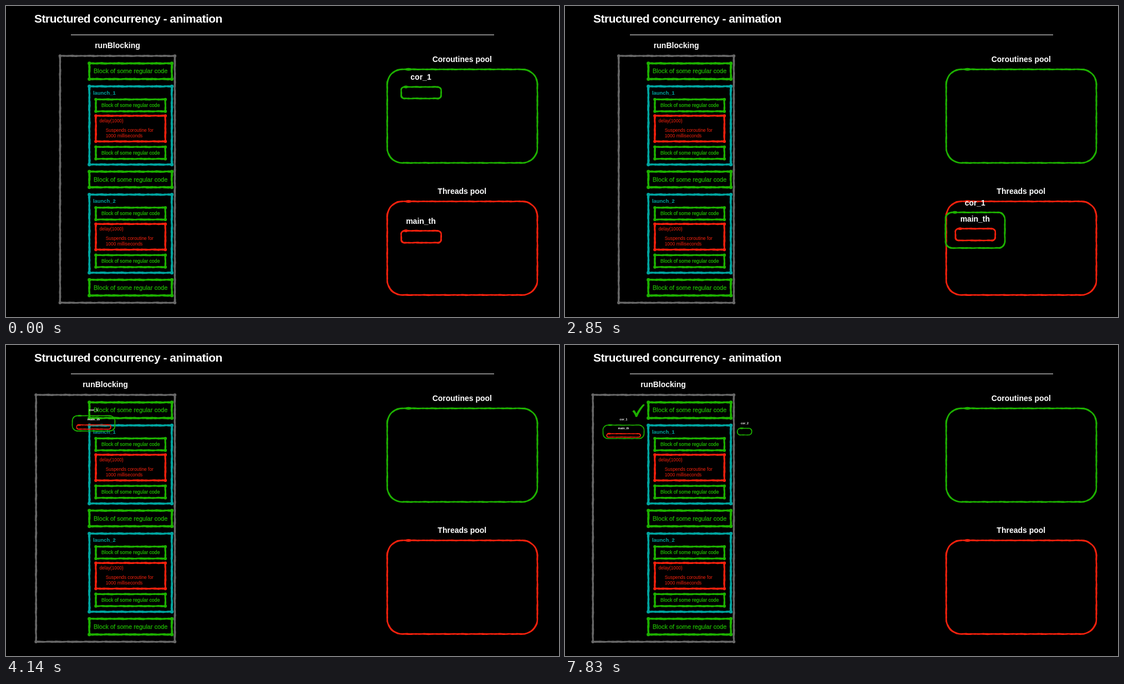
An HTML page with a canvas that plays this animation: 997x561 px, repeating every 8 s.

```html
<!DOCTYPE html>
<html lang="en">
<head>
<meta charset="utf-8">
<title>Structured concurrency</title>
<style>
  html, body { margin: 0; width: 100%; height: 100%; overflow: hidden; background: #000; }
  canvas { display: block; }
</style>
</head>
<body>
<canvas id="stage" width="997" height="561"></canvas>
<script>
const ctx = document.getElementById('stage').getContext('2d');
const GREEN = '#1db100', RED = '#f6210d', TEAL = '#00a5a0', GRAY = '#686868', WHITE = '#fff';
const LOOP = 8000, MOVE = 1800;

// Poses of the coroutine and its thread: [x0, y0, x1, y1, radius, line width]
const CORS = [
  [712.5, 146, 784.5, 166.8, 6, 2.9],
  [694.5, 376, 802, 440.8, 12, 2.9],
  [68.5, 105.5, 142.5, 129.7, 9, 1.7],
  [68.5, 144.5, 142.5, 168.7, 9, 1.7]
];
const THREADS = [
  [712.5, 405.5, 784.5, 427, 6, 2.9],
  [712.5, 405.5, 784.5, 427, 6, 2.9],
  [75.3, 121, 136, 127.3, 3, 1.7],
  [75.3, 160, 136, 166.3, 3, 1.7]
];
// Their labels: [centre x, baseline, font size]
const COR_LABELS = [[748, 133, 14], [748, 364, 14], [105.5, 97.3, 5.2], [105.5, 136.3, 5.2]];
const THREAD_LABELS = [[748, 393, 14], [748, 393, 14], [105.5, 113.4, 5.2], [105.5, 152.4, 5.2]];

const lerp = (a, b, p) => a + (b - a) * p;

// cubic-bezier(.42, 0, .58, 1)
function ease(p) {
  if (p <= 0 || p >= 1) return p <= 0 ? 0 : 1;
  let lo = 0, hi = 1, s;
  for (let i = 0; i < 20; i++) {
    s = (lo + hi) / 2;
    const x = 1.26 * s * (1 - s) ** 2 + 1.74 * s * s * (1 - s) + s ** 3;
    if (x < p) lo = s; else hi = s;
  }
  return s * s * (3 - 2 * s);
}

function text(str, x, y, size, color, weight = 'bold', align = 'left', spacing = 0) {
  ctx.font = `${weight} ${size}px "Liberation Sans", Arial, sans-serif`;
  ctx.textAlign = align;
  ctx.letterSpacing = spacing + 'px';
  ctx.fillStyle = color;
  ctx.fillText(str, x, y);
}

const label = (str, x, y, size = 14) => text(str, x, y, size, WHITE, 'bold', 'center');

const wobble = s => (Math.sin(s * .37) + Math.sin(s * .83 + 2) + Math.sin(s * .19 + 4)) * .1;

// Hand-drawn frame: a closed band of uneven width with blobs where the pen rests
function outline(x0, y0, x1, y1, r, lw, color) {
  const corners = [[x0, y0], [x1, y0], [x1, y1], [x0, y1]];
  const outer = [], inner = [];
  let s = 0;
  const add = (x, y, nx, ny) => {
    const o = lw / 2 * (1 + wobble(s)), i = lw / 2 * (1 + wobble(s + 61));
    outer.push([x + nx * o, y + ny * o]);
    inner.push([x - nx * i, y - ny * i]);
  };
  corners.forEach(([cx, cy], i) => {
    const a = i * Math.PI / 2, dx = Math.cos(a), dy = Math.sin(a);
    const len = (i % 2 ? y1 - y0 : x1 - x0) - 2 * r;
    const n = Math.max(1, Math.round(len / 2.5));
    for (let k = 0; k <= n; k++) {
      const d = r + len * k / n;
      add(cx + dx * d, cy + dy * d, dy, -dx);
      s += len / n;
    }
    if (!r) return;
    const mx = cx + dx * (r + len) - dy * r, my = cy + dy * (r + len) + dx * r;
    for (let k = 1; k < 10; k++) {
      const b = a + (k / 10 - 1) * Math.PI / 2;
      add(mx + Math.cos(b) * r, my + Math.sin(b) * r, Math.cos(b), Math.sin(b));
      s += r * .157;
    }
  });
  ctx.fillStyle = color;
  ctx.beginPath();
  for (const ring of [outer, inner]) {
    ring.forEach(([x, y], i) => i ? ctx.lineTo(x, y) : ctx.moveTo(x, y));
    ctx.closePath();
  }
  ctx.fill('evenodd');
  ctx.beginPath();
  if (r) ctx.ellipse(x0 + r * 1.42, y0, 3 + r * .12, lw * .85, 0, 0, 7);
  else for (const [x, y] of corners) {
    ctx.moveTo(x, y);
    ctx.arc(x, y, lw * .83, 0, 7);
  }
  ctx.fill();
}

function codeBlock(x0, y0, x1, y1, size, lw) {
  outline(x0, y0, x1, y1, 0, lw, GREEN);
  const mid = (x0 + x1) / 2, base = (y0 + y1) / 2 + size * .34;
  const str = 'Block of some regular code';
  text(str, mid, base, size, GREEN, 'normal', 'center');
  ctx.strokeStyle = GREEN;
  ctx.lineWidth = .3;
  ctx.strokeText(str, mid, base);
}

function launch(name, y) {
  outline(150.3, y, 299, y + 141, 0, 3.8, TEAL);
  text(name, 157, y + 15, 9.4, TEAL);
  codeBlock(162, y + 23.5, 287.3, y + 45, 8.7, 3.4);
  outline(162, y + 53, 287.3, y + 99.3, 0, 3.4, RED);
  text('delay(1000)', 168.5, y + 64.7, 8.2, RED, 'normal');
  text('Suspends coroutine for', 179.7, y + 82, 8.4, RED, 'normal');
  text('1000 milliseconds', 179.7, y + 92, 8.4, RED, 'normal');
  codeBlock(162, y + 109.2, 287.3, y + 130.8, 8.7, 3.4);
}

function check(alpha) {
  ctx.globalAlpha = alpha;
  ctx.fillStyle = GREEN;
  ctx.beginPath();
  ctx.moveTo(121.3, 119.5);
  ctx.lineTo(124.5, 117.3);
  ctx.quadraticCurveTo(127, 119.5, 128.8, 123.5);
  ctx.quadraticCurveTo(134, 113.5, 141, 106.8);
  ctx.lineTo(144, 107.8);
  ctx.quadraticCurveTo(135, 118, 130.3, 129.6);
  ctx.lineTo(127.4, 130);
  ctx.quadraticCurveTo(125, 123, 121.3, 119.5);
  ctx.fill();
  ctx.globalAlpha = 1;
}

function draw(t) {
  const steps = [450, 2700, 4950].map(start => ease((t - start) / MOVE));
  const pose = keys => keys[0].map((v, i) =>
    steps.reduce((sum, p, k) => sum + (keys[k + 1][i] - keys[k][i]) * p, v));

  ctx.fillStyle = '#000';
  ctx.fillRect(0, 0, 997, 561);
  text('Structured concurrency - animation', 51, 30.3, 21, WHITE, 'bold', 'left', -.5);
  ctx.fillStyle = '#c4c4c4';
  ctx.fillRect(117, 51.4, 763, 1.3);

  label('runBlocking', lerp(201, 177, steps[1]), 76);
  outline(lerp(97.5, 50.3, steps[1]), 90, 304.4, 535.3, 0, 3.4, GRAY);
  for (const y of [103.5, 298.7, 493.9]) codeBlock(150.3, y, 299, y + 28.3, 11, 3.8);
  launch('launch_1', 145);
  launch('launch_2', 340.2);

  label('Coroutines pool', 822.3, 100.6);
  outline(687.3, 114.3, 958, 283, 27, 2.9, GREEN);
  label('Threads pool', 822.3, 339);
  outline(687.3, 352.5, 958, 521.3, 27, 2.9, RED);

  check(steps[2]);
  outline(...pose(CORS), GREEN);
  label('cor_1', ...pose(COR_LABELS));
  outline(...pose(THREADS), RED);
  label('main_th', ...pose(THREAD_LABELS));

  ctx.globalAlpha = Math.min(1, Math.max(0, (t - 7420) / 410));
  outline(310.7, 150.3, 336.7, 162.3, 5.5, 1.7, GREEN);
  label('cor_2', 324, 142.6, 5.2);
  ctx.globalAlpha = 1;
}

let start;
function tick(now) {
  start ??= now;
  draw((now - start) % LOOP);
  requestAnimationFrame(tick);
}
requestAnimationFrame(tick);
</script>
</body>
</html>
```
